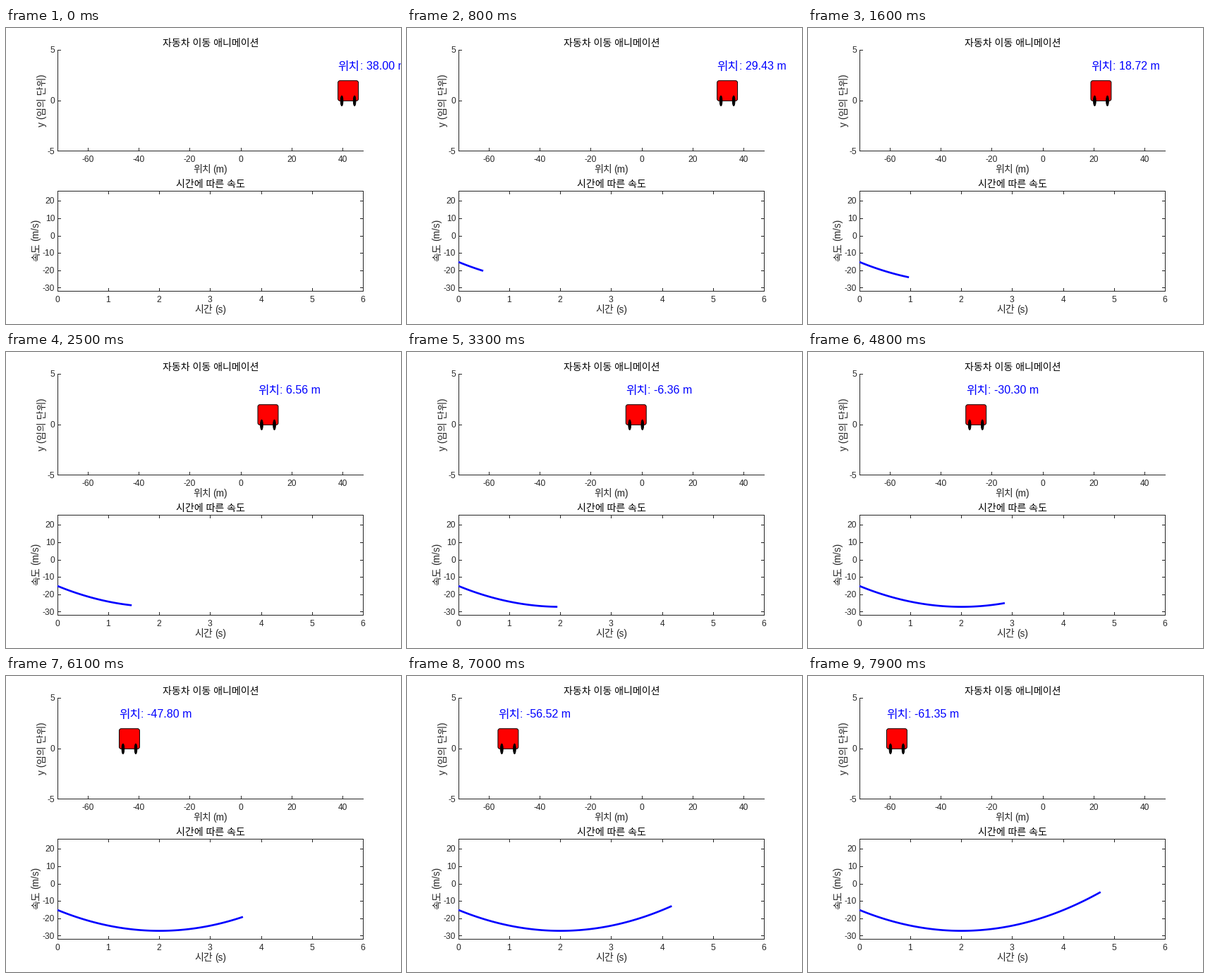
These frames come from a looping animation (560 px wide and 420 px high, 8000 ms). A matplotlib script:

```python
import numpy as np
import matplotlib.pyplot as plt
from matplotlib.animation import FuncAnimation
from matplotlib.patches import Ellipse, FancyBboxPatch

W, H, DPI = 560, 420, 100
PT = 72 / DPI
FRAMES, INTERVAL = 80, 100
INK = "#262626"
FONTS = ["Liberation Sans", "Noto Sans CJK JP"]
TICK, LABEL, KOREAN, BIG, BIG_KOREAN = 12, 13.8, 14, 16, 16.9

LEFT, RIGHT = 73, 506.8
# top, bottom, lowest value, highest value
TOP_AXES = (31.8, 174.95, -5, 5)
LOW_AXES = (231, 373.9, -32, 26)
TIMES = np.linspace(0, 6, 100)


def position(t):
    return t**3 - 6 * t**2 - 15 * t + 38


def velocity(t):
    return 3 * t**2 - 12 * t - 15


def map_x(value, low, high):
    return LEFT + (value - low) / (high - low) * (RIGHT - LEFT)


def map_y(value, axes):
    top, bottom, low, high = axes
    return bottom - (value - low) / (high - low) * (bottom - top)


def road_x(value):
    return map_x(value, -72, 48)


def time_x(value):
    return map_x(value, 0, 6)


def pixel(value):
    return np.floor(value) + 0.5


fig = plt.figure(figsize=(W / DPI, H / DPI), dpi=DPI, facecolor="white")
ax = fig.add_axes([0, 0, 1, 1])
ax.set_xlim(0, W)
ax.set_ylim(H, 0)
ax.axis("off")


def write(x, y, text, px, color=INK, ha="left", angle=0):
    return ax.text(x, y, text, fontsize=px * PT, family=FONTS, color=color,
                   weight="light", ha=ha, va="baseline", rotation=angle,
                   rotation_mode="anchor")


def stroke(x0, y0, x1, y1):
    ax.plot([x0, x1], [y0, y1], color=INK, lw=PT, snap=False,
            solid_capstyle="projecting")


def draw_axes(axes, to_x, xticks, yticks, boxed):
    left, right = pixel(LEFT), pixel(RIGHT)
    top, bottom = pixel(axes[0]), pixel(axes[1])
    stroke(left, bottom, right, bottom)
    stroke(left, top, left, bottom)
    if boxed:
        stroke(left, top, right, top)
        stroke(right, top, right, bottom)
    for value in xticks:
        x = pixel(to_x(value))
        stroke(x, bottom, x, bottom - 4)
        if boxed:
            stroke(x, top, x, top + 4)
        write(to_x(value) - 0.6, bottom + 15.5, str(value), TICK, ha="center")
    for value in yticks:
        y = pixel(map_y(value, axes))
        stroke(left, y, left + 4, y)
        if boxed:
            stroke(right, y, right - 4, y)
        write(69.3, map_y(value, axes) + 3.6, str(value), TICK, ha="right")


draw_axes(TOP_AXES, road_x, range(-60, 41, 20), (-5, 0, 5), False)
draw_axes(LOW_AXES, time_x, range(7), range(-30, 21, 10), True)

middle = (LEFT + RIGHT) / 2
write(middle, 26, "자동차 이동 애니메이션", KOREAN, "black", "center")
write(middle, 226, "시간에 따른 속도", KOREAN, "black", "center")
write(265.2, 205.4, "위치", KOREAN)
write(293.2, 204.8, "(m)", LABEL)
write(267.4, 404.4, "시간", KOREAN)
write(295.8, 403.8, "(s)", LABEL)
write(55, 139.8, "y (", LABEL, angle=90)
write(56, 124.6, "임의 단위", KOREAN, angle=90)
write(55, 69.6, ")", LABEL, angle=90)
write(47, 331, "속도", KOREAN, angle=90)
write(46.4, 302, "(m/s)", LABEL, angle=90)

METER = road_x(1) - road_x(0)
GROUND = map_y(0, TOP_AXES)
ROOF = map_y(2, TOP_AXES)
body = FancyBboxPatch((0, ROOF), 8 * METER, GROUND - ROOF,
                      boxstyle="round,pad=0,rounding_size=2.9",
                      fc="red", ec="black", lw=PT, zorder=3)
wheels = [Ellipse((0, GROUND), METER, (GROUND - ROOF) / 2,
                  fc="black", ec="black", lw=PT, zorder=4) for _ in range(2)]
for patch in (body, *wheels):
    ax.add_patch(patch)

caption = write(0, 60, "위치", BIG_KOREAN, "blue")
reading = write(0, 59, "", BIG, "blue")
curve, = ax.plot([], [], color="blue", lw=2.67 * PT,
                 solid_capstyle="butt", zorder=5)


def update(frame):
    # The motion pauses for one frame after two seconds.
    step = frame if frame < 20 else frame - 1
    place = position(TIMES[step])
    x = road_x(place)
    body.set_x(x)
    for wheel, offset in zip(wheels, (1.5, 6.5)):
        wheel.set_center((x + offset * METER, GROUND))
    caption.set_x(x)
    reading.set_x(x + 31)
    reading.set_text(f": {place:.2f} m")
    past = TIMES[:step + 1]
    curve.set_data(time_x(past), map_y(velocity(past), LOW_AXES))
    return [body, *wheels, caption, reading, curve]


anim = FuncAnimation(fig, update, frames=FRAMES, interval=INTERVAL,
                     repeat=True, repeat_delay=0)
plt.show()
```
